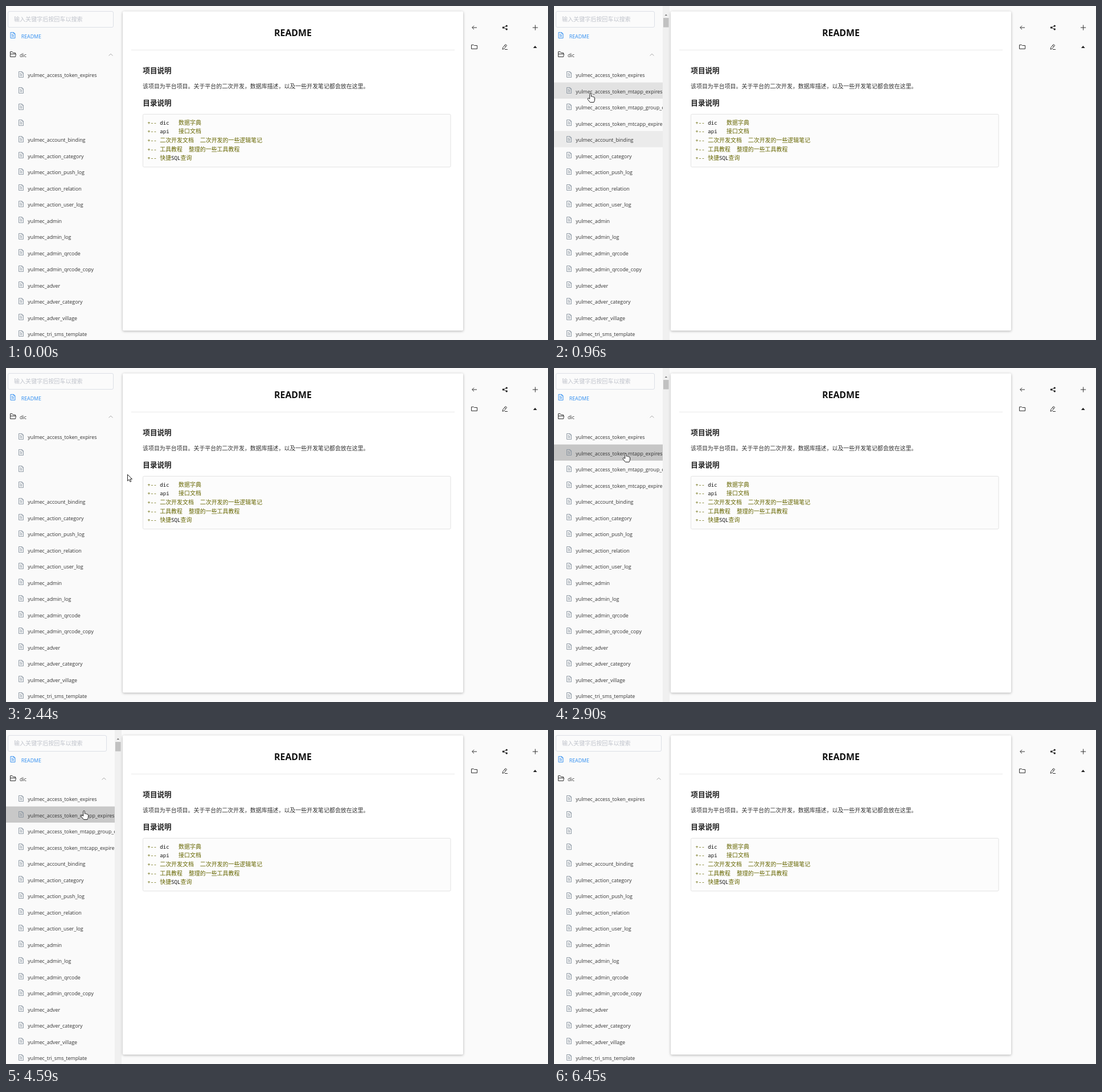
Animation, 952 px wide and 588 px high, one loop 7.84 s. Source, as an HTML page:

```html
<!DOCTYPE html>
<html lang="zh-CN">
<head>
<meta charset="utf-8">
<title>README</title>
<style>
  html, body { margin: 0; width: 100%; height: 100%; overflow: hidden; background: #fafafa; }
  svg { display: block; width: 952px; height: 588px; }
  text { font: 8.85px "Open Sans", "Noto Sans CJK SC", sans-serif; fill: #333; white-space: pre; }
  .hint { font-size: 10.05px; fill: #c0c4cc; }
  .link { fill: #2d8cf0; }
  .title { font-size: 15.9px; font-weight: 700; fill: #111; text-anchor: middle; }
  .heading { font: 700 12.6px "Noto Sans CJK SC", sans-serif; fill: #222; }
  .body { font: 9.95px "Noto Sans CJK SC", sans-serif; }
  .code { font: 9.15px "Noto Sans Mono", monospace; fill: #111; }
  .code .mark { fill: #660; }
  .code .han { font: 9.95px "Noto Sans CJK SC", sans-serif; fill: #660; }
  .paper { fill: #fff; filter: drop-shadow(0 1px 2px rgba(0, 0, 0, .3)); }
  .line { fill: none; stroke: #333; stroke-width: 1; }
  .pointer { fill: #fff; stroke: #222; stroke-width: 1; stroke-linejoin: round; }
</style>
</head>
<body>
<svg viewBox="0 0 952 588">
  <defs>
    <clipPath id="side"><rect width="191" height="588"/></clipPath>
    <g id="doc" fill="none" stroke-width=".9">
      <path d="M.5 .5H6L8.5 3V10.5H.5ZM6 .5V3H8.5M2.3 3.5H4.3M2.3 5.5H6.8M2.3 7.7H6.8"/>
    </g>
  </defs>

  <g id="sidebar" clip-path="url(#side)">
    <rect id="input" x="3.5" y="9.5" width="185" height="28" rx="2.5" fill="#fbfbfb" stroke="#dcdfe6"/>
    <text class="hint" x="14" y="27.3">输入关键字后按回车以搜索</text>
    <use href="#doc" x="7.5" y="46" stroke="#2d8cf0"/>
    <text class="link" x="26.7" y="57">README</text>
    <path class="line" d="M7.5 89.5V80.5H11L12.5 82.5H16.5V84.5M7.5 84.5H17.5L16.5 89.5H7.5"/>
    <text x="24" y="89.6">dic</text>
    <path id="chevron" class="line" d="M180.5 87.5L184 84.3L187.5 87.5" style="stroke:#aaa"/>
    <g id="rows"></g>
  </g>

  <g id="scrollbar">
    <rect x="191" width="12" height="588" fill="#f0f0f0"/>
    <rect x="192" y="21" width="9.5" height="16.5" fill="#c1c1c1"/>
    <path d="M194.5 17L196.8 14.6L199.1 17Z" fill="#777"/>
  </g>

  <rect class="paper" x="205" y="9.5" width="598" height="562" rx="2"/>
  <text class="title" x="504" y="52.6">README</text>
  <path d="M220 77.5H788" stroke="#e9e9e9"/>
  <text class="heading" x="240.3" y="118">项目说明</text>
  <text class="body" x="240" y="144.6">该项目为平台项目。关于平台的二次开发，数据库描述，以及一些开发笔记都会放在这里。</text>
  <text class="heading" x="240.3" y="175">目录说明</text>
  <rect x="240.5" y="190.5" width="540.5" height="93" rx="2" fill="#fcfcfc" stroke="#e3e3e3"/>
  <g id="code"></g>

  <g class="line">
    <path d="M827 38H818.7M822 34.7L818.7 38L822 41.3"/>
    <path d="M879.5 35L873.5 38L879.5 41"/>
    <g fill="#222" stroke="none">
      <circle cx="873.5" cy="38" r="1.8"/>
      <circle cx="879.3" cy="35.1" r="1.7"/>
      <circle cx="879.3" cy="40.9" r="1.7"/>
      <path d="M926 74L929.3 70L932.7 74Z"/>
    </g>
    <path d="M925 38H934.2M929.6 33.4V42.6"/>
    <path d="M817.5 68.5H821.5L822.5 69.5H827.5V75.5H817.5Z"/>
    <path d="M872 76.3L872.7 73.2L877.3 67.5L879.7 69.4L875 75.2ZM875.7 69.6L878 71.4M876 76.5H881"/>
  </g>

  <g id="pointer">
    <path id="arrow" class="pointer" d="M.5 .5V11.8L3.2 9.3L5 13.4L6.9 12.6L5.1 8.6H8.6Z"/>
    <path id="hand" class="pointer" d="M-1.3 9.5V1.3Q-1.2 .2 0 .2Q1.2 .2 1.3 1.3V5.3Q3 4.6 3.6 5.8Q5.2 5.2 5.8 6.5Q7.4 6.2 7.5 7.8V11Q7.4 13 6 15.6H-.6L-4.6 10.6Q-5.2 9 -4.2 8.3Q-3.2 7.9 -2.4 8.7Z"/>
  </g>
</svg>

<script>
const LOOP = 7840, ROW = 28.5, ROWS_TOP = 106.1, FADE = 114;
const $ = id => document.getElementById(id);

const PREFIX = 'yulmec_';
const names = `access_token_expires access_token_mtapp_expires access_token_mtapp_group_expires
  access_token_mtcapp_expires account_binding action_category action_push_log action_relation
  action_user_log admin admin_log admin_qrcode admin_qrcode_copy adver adver_category
  adver_village tri_sms_template`.split(/\s+/);

// Long names only appear while the sidebar is hovered.
const isLong = i => i > 0 && i < 4;
$('rows').innerHTML = names.map((name, i) => {
  const y = ROWS_TOP + ROW * i;
  return `<rect y="${y}" width="191" height="${ROW}" fill="#c4c4c4" opacity="0"/>
    <use href="#doc" x="22" y="${Math.round(y + 8.4)}" stroke="#84909c"/>
    <text class="${isLong(i) ? 'long' : ''}" x="38.3" y="${y + 19.2}">${PREFIX + name}</text>`;
}).join('');

const listing = ['dic   数据字典', 'api   接口文档', '二次开发文档  二次开发的一些逻辑笔记',
  '工具教程  整理的一些工具教程', '快捷SQL查询'];
$('code').innerHTML = listing.map((line, i) => {
  const body = line.replace(/[\u4e00-\u9fff]+/g, '<tspan class="han">$&</tspan>');
  return `<text class="code" x="248.3" y="${208.6 + 15.7 * i}"><tspan class="mark">+-- </tspan>${body}</text>`;
}).join('');

// Pointer path: time, x, y, number of steps taken to get there.
const path = [
  [70, 876, 538, 1], [727, 218, 312, 9], [800, 76, 282, 1], [890, 68, 234, 1], [960, 63.5, 154, 1],
  [1130, 62, 151, 2],
  [1420, 88, 160, 1], [1970, 533, 357, 7],
  [2210, 492, 330, 1], [2440, 212.5, 187, 3], [2520, 166, 160, 1], [2900, 125.5, 150, 5],
  [3130, 142, 157, 1], [3760, 503, 344, 8],
  [3990, 481, 327, 1], [4215, 235, 192, 3], [4290, 165, 162, 1], [4590, 136.5, 142, 4],
  [5140, 158, 150, 1], [5900, 672, 410, 10],
  [5980, 690, 432, 1], [6372, 873, 577, 5], [6450, 900, 640, 1]
];

// Multi-step moves are evenly spaced in time; the longer ones ease in and out.
function buildSteps() {
  const steps = [{ t: 0, x: 900, y: 640 }];
  for (const [t, x, y, count] of path) {
    const from = steps[steps.length - 1];
    for (let i = 1; i <= count; i++) {
      const u = i / count;
      const p = count > 3 ? (1 - Math.cos(Math.PI * u)) / 2 : u;
      steps.push({
        t: from.t + (t - from.t) * u,
        x: from.x + (x - from.x) * p,
        y: from.y + (y - from.y) * p
      });
    }
  }
  return steps;
}

const steps = buildSteps();

// Each row's shade eases towards its hover state.
let shades = names.map(() => 0);
steps.forEach((step, i) => {
  const last = steps[i - 1];
  step.open = step.x < 203;
  step.over = step.x < 191;
  const hovered = step.over && last.open ? Math.floor((step.y - ROWS_TOP) / ROW) : -1;
  const keep = last ? Math.exp((last.t - step.t) / FADE) : 1;
  shades = step.open
    ? shades.map((shade, row) => shade * keep + (row === hovered ? 1 - keep : 0))
    : shades.map(() => 0);
  step.shades = shades;
});

const bars = document.querySelectorAll('#rows rect');
const longNames = document.querySelectorAll('.long');
const show = (node, on) => { node.style.display = on ? '' : 'none'; };

let current;
function draw(now) {
  const time = now % LOOP;
  let step = steps[0];
  for (const s of steps) if (s.t <= time + 1) step = s;
  if (step !== current) {
    current = step;
    $('pointer').setAttribute('transform', `translate(${Math.round(step.x)} ${Math.round(step.y)})`);
    show($('arrow'), !step.over);
    show($('hand'), step.over);
    show($('scrollbar'), step.open);
    longNames.forEach(node => show(node, step.open));
    $('input').setAttribute('width', step.open ? 173 : 185);
    $('chevron').setAttribute('transform', `translate(${step.open ? -12 : 0})`);
    bars.forEach((bar, i) => bar.setAttribute('opacity', step.shades[i].toFixed(3)));
  }
  requestAnimationFrame(draw);
}
draw(performance.now());
</script>
</body>
</html>
```
